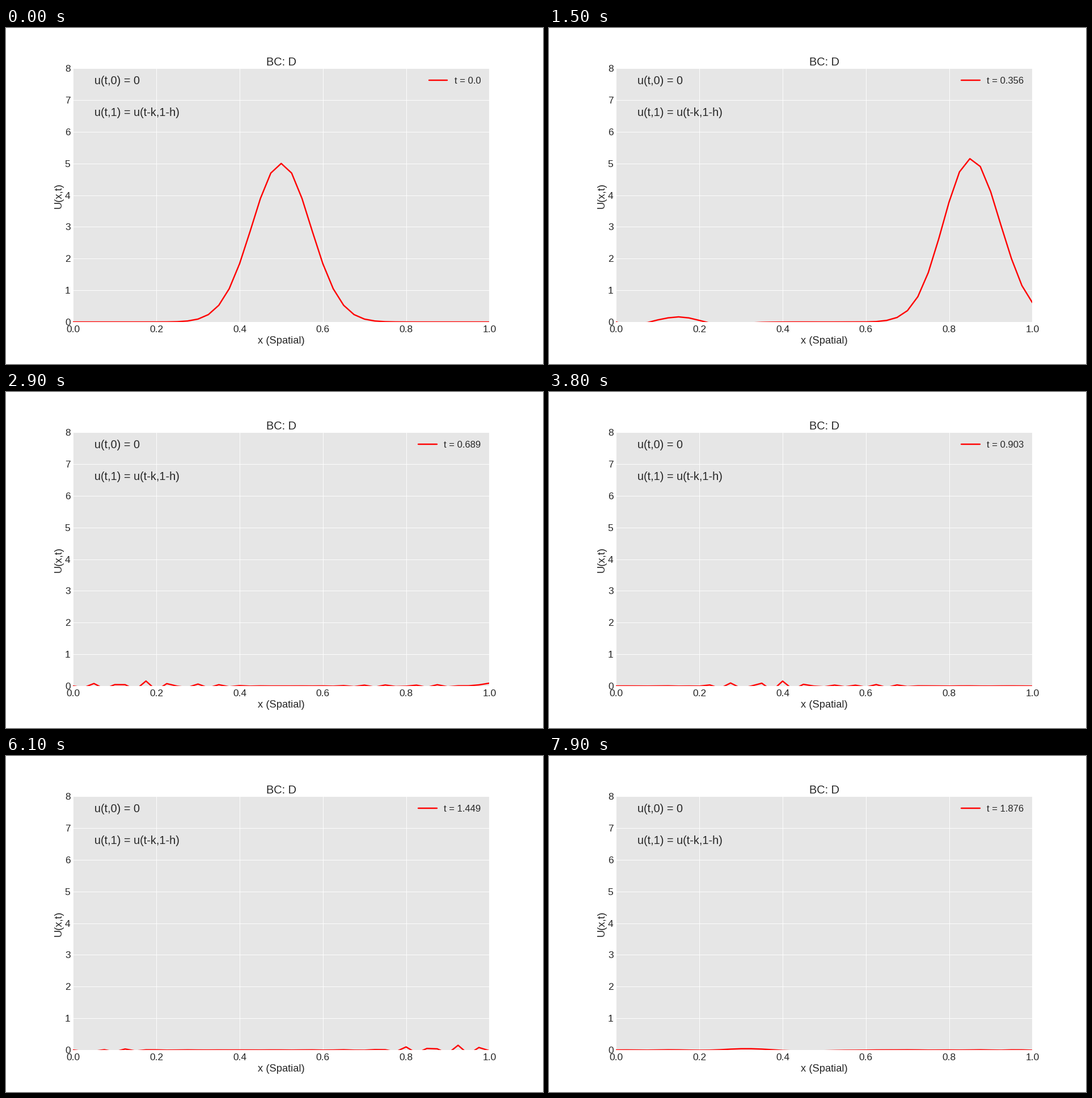
Recreate the animation shown at these times as a matplotlib script. Size 947 by 592 pixels, loop 8 s.

```python
import matplotlib.pyplot as plt
import numpy as np
from matplotlib.animation import FuncAnimation

W, H, DPI = 947, 592, 100
FRAMES, INTERVAL = 80, 100
INK = "#262626"

# Advection u_t + u_x = 0, leapfrog in time with a forward Euler first step
CELLS = 40
DX = 1 / CELLS
COURANT = 0.95
DT = COURANT * DX


def solve(steps):
    x = np.linspace(0, 1, CELLS + 1)
    u = [5 * np.exp(-100 * (x - 0.5) ** 2)]
    t = [0.0]
    for n in range(1, steps):
        now = u[-1]
        base, c = (now, COURANT / 2) if n == 1 else (u[-2], COURANT)
        new = np.zeros_like(now)
        new[1:-1] = base[1:-1] - c * (now[2:] - now[:-2])
        new[-1] = now[-2]
        u.append(new)
        t.append(t[-1] + DT)
    return x, u, t


x, u, times = solve(FRAMES)

plt.rcParams.update({
    "font.family": "Liberation Sans",
    "text.color": INK,
    "xtick.color": INK,
    "ytick.color": INK,
    "lines.solid_capstyle": "round",
})

fig = plt.figure(figsize=(W / DPI, H / DPI), dpi=DPI, facecolor="white")
ax = fig.add_axes([0.125, 0.125, 0.775, 0.755], facecolor="#e6e6e6")
ax.set(xlim=(0, 1), ylim=(0, 8))
ax.spines[:].set_visible(False)
ax.set_axisbelow(True)
ax.grid(color="white", lw=0.65)
ax.tick_params(length=0, pad=3.5, labelsize=12.5)
ax.tick_params(axis="x", pad=4.2)
ax.set_title("BC: D", fontsize=14.4, pad=3.6)
ax.text(0.051, 7.5, "u(t,0) = 0", fontsize=14.3)
ax.text(0.051, 6.5, "u(t,1) = u(t-k,1-h)", fontsize=14.3)


def axis_label(px, py, text, **kw):
    fig.text(px / W, 1 - py / H, text, fontsize=13.2,
             ha="center", va="center", **kw)


axis_label(485.4, 551, "x (Spatial)")
axis_label(93.5, 296, "U(x,t)", rotation=90)

line, = ax.plot(x, u[0], color="red", lw=1.75, label="t = 0.0")
legend = ax.legend(loc="upper right", fontsize=12, frameon=False,
                   handlelength=1.95, handletextpad=0.75)
stamp = legend.get_texts()[0]


def update(i):
    line.set_ydata(u[i])
    stamp.set_text(f"t = {round(times[i], 3)}")
    return line, stamp


anim = FuncAnimation(fig, update, frames=FRAMES, interval=INTERVAL,
                     init_func=lambda: update(0), repeat=True, repeat_delay=0)
plt.show()
```
